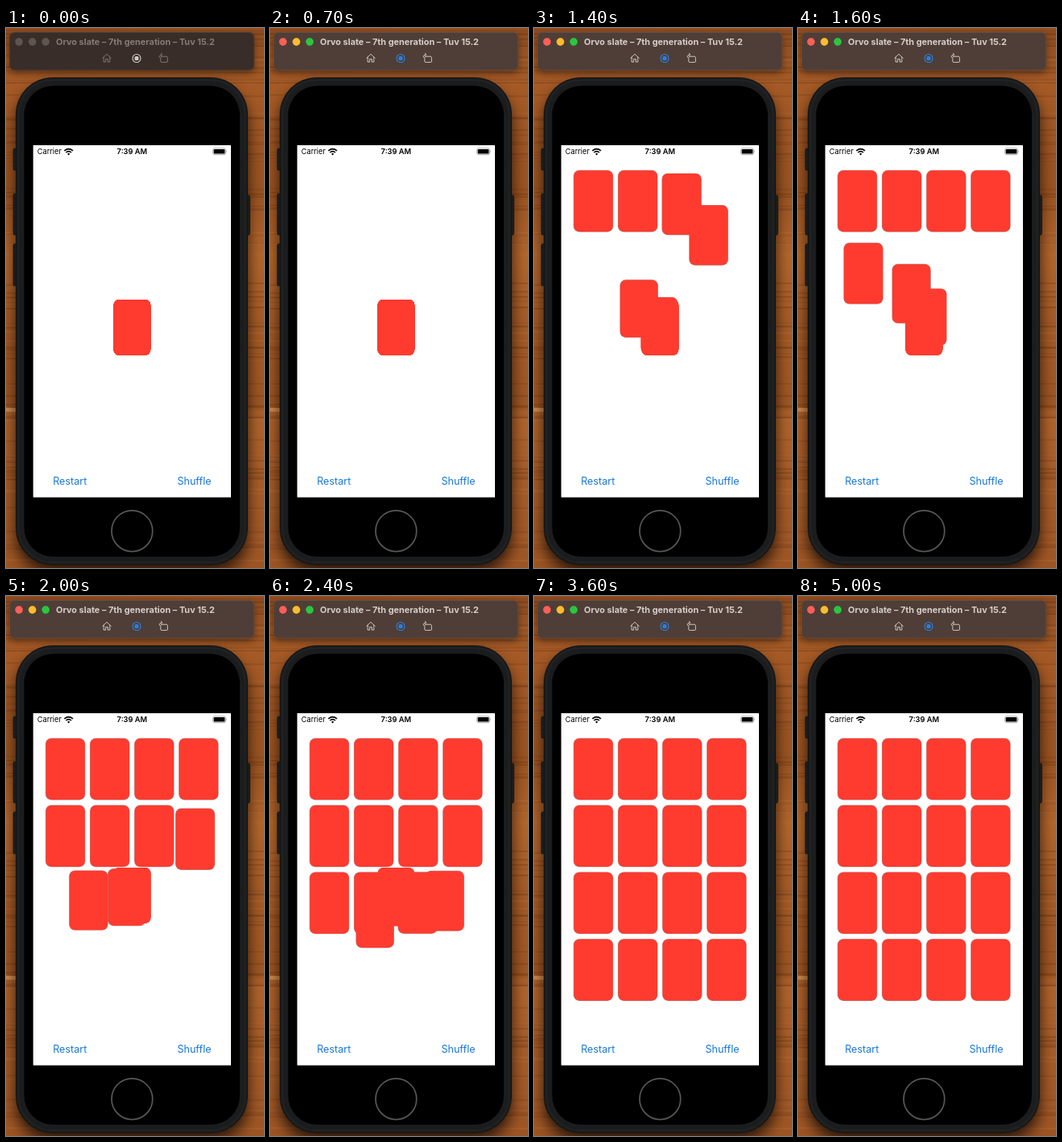
These frames come from a looping animation (320 px wide and 668 px high, 5.1 s). An HTML page:

```html
<!DOCTYPE html>
<html lang="en">
<head>
<meta charset="utf-8">
<title>Card deal</title>
<style>
  html, body { margin: 0; width: 100%; height: 100%; overflow: hidden; background: #9a5424; }
  svg { display: block; width: 100vw; height: 100vh; }
  text { font-family: Inter, "Liberation Sans", sans-serif; }
</style>
</head>
<body>
<svg viewBox="0 0 320 668" preserveAspectRatio="none">
  <defs>
    <linearGradient id="wood" x1="0" y1="0" x2="0" y2="1">
      <stop offset="0" stop-color="#8f4c20"/>
      <stop offset=".1" stop-color="#a55a26"/>
      <stop offset=".3" stop-color="#9a5321"/>
      <stop offset=".42" stop-color="#b2652c"/>
      <stop offset=".55" stop-color="#a45a26"/>
      <stop offset=".7" stop-color="#9f5623"/>
      <stop offset=".72" stop-color="#b0632c"/>
      <stop offset="1" stop-color="#9c5424"/>
    </linearGradient>
    <filter id="soft" x="-20%" y="-30%" width="140%" height="170%">
      <feGaussianBlur stdDeviation="5"/>
    </filter>
    <filter id="wide" x="-20%" y="-10%" width="140%" height="120%">
      <feGaussianBlur stdDeviation="9"/>
    </filter>
  </defs>

  <rect width="320" height="668" fill="url(#wood)"/>
  <g id="grain" fill="none"></g>
  <path d="M0 469.5L12 470V475L0 474.5Z" fill="#d08c4e"/>

  <!-- toolbar window -->
  <rect x="4" y="9" width="304" height="47" rx="7" fill="#000" opacity=".4" filter="url(#soft)"/>
  <rect id="bar" x="4.5" y="5.5" width="303.3" height="46.6" rx="6" stroke-width=".8"/>
  <g id="lights">
    <circle cx="16.1" cy="17.1" r="4.8"/>
    <circle cx="32.7" cy="17.1" r="4.8"/>
    <circle cx="49.2" cy="17.1" r="4.8"/>
  </g>
  <text id="title" x="62" y="20.7" font-size="10.9" font-weight="700">Orvo slate – 7th generation – Tuv 15.2</text>
  <g id="tools" fill="none" stroke-width="1" stroke-linejoin="round" stroke-linecap="round">
    <path d="M119.8 37.2L125 32.3L130.2 37.2M121.2 36.2V42H123.7V38.4H126.3V42H128.8V36.2"/>
    <path d="M193.2 35.2H199Q200.4 35.2 200.4 36.6V41Q200.4 42.4 199 42.4H193.2Q191.8 42.4 191.8 41V36.6Q191.8 35.2 193.2 35.2M190 36.2Q190 32.8 193.6 32.7M192.4 31.4L193.9 32.7L192.4 34"/>
  </g>
  <g id="shot">
    <circle cx="162" cy="37.5" r="5" fill="none" stroke="currentColor" stroke-width="1.1"/>
    <rect x="159.5" y="35" width="5" height="5" rx="1.6" fill="currentColor"/>
  </g>

  <!-- device -->
  <rect x="12" y="72" width="288" height="603" rx="46" fill="#000" opacity=".72" filter="url(#wide)"/>
  <g fill="#1c1c1d" stroke="#0e0e0e" stroke-width=".6">
    <rect x="9" y="149" width="7" height="27" rx="2"/>
    <rect x="9" y="205" width="7" height="51" rx="2"/>
    <rect x="9" y="267" width="7" height="52" rx="2"/>
    <rect x="296" y="207" width="6.5" height="49" rx="2"/>
  </g>
  <rect x="12.5" y="61.5" width="287" height="602.5" rx="45" fill="#1b1c1d" stroke="#151516"/>
  <rect x="15.5" y="64.5" width="281" height="596.5" rx="42" fill="none" stroke="#232425" stroke-width="1.5"/>
  <rect x="22.5" y="71.5" width="267.5" height="582.5" rx="36" fill="#000"/>
  <circle cx="156.4" cy="622.2" r="25.4" fill="#000" stroke="#58595a" stroke-width="1.7"/>

  <!-- screen -->
  <rect x="33.7" y="145" width="245.3" height="435.6" fill="#fff"/>
  <text x="38.8" y="156.4" font-size="9.2">Carrier</text>
  <g fill="none" stroke="#000" stroke-width="1.6">
    <path d="M72.4 151.8Q77.7 147.4 83 151.8"/>
    <path d="M74.3 154Q77.7 151.2 81.1 154"/>
  </g>
  <path d="M75.9 155.6Q77.7 154.2 79.5 155.6L77.7 157.4Z"/>
  <text x="156.4" y="156.4" font-size="9.3" font-weight="600" text-anchor="middle">7:39 AM</text>
  <rect x="256.6" y="148.9" width="15.9" height="7.8" rx="2.2" fill="none" stroke="#888" stroke-width=".7"/>
  <rect x="257.7" y="150" width="13.7" height="5.6" rx="1.2"/>
  <path d="M273.4 151.6Q274.6 152.8 273.4 154Z" fill="#888"/>
  <g fill="#1677d8" font-size="12.6">
    <text x="58.2" y="564.8">Restart</text>
    <text x="212.4" y="564.8">Shuffle</text>
  </g>
  <g id="edges" fill="#8a6a6a"></g>
  <g id="faces" fill="#ff3b30"></g>
</svg>
<script>
const LOOP = 5100, TICK = 100;
const ACTIVE_AT = 700, DEAL_AT = 705, STAGGER = 125, MOVE = 500;
const START = { x: 133.5, y: 336, w: 45.7, h: 68.7 };
const $ = id => document.getElementById(id);

function add(parent, tag, attrs) {
  const el = document.createElementNS("http://www.w3.org/2000/svg", tag);
  return parent.appendChild(set(el, attrs));
}
function set(el, attrs) {
  for (const k in attrs) el.setAttribute(k, attrs[k]);
  return el;
}
const mix = (a, b, p) => a + (b - a) * p;

// ease-in-out: cubic-bezier(.42, 0, .58, 1)
function ease(x) {
  if (x <= 0) return 0;
  if (x >= 1) return 1;
  let lo = 0, hi = 1, u = x;
  for (let i = 0; i < 24; i++) {
    u = (lo + hi) / 2;
    const v = 1 - u;
    if (1.26 * u * v * v + 1.74 * u * u * v + u * u * u < x) lo = u; else hi = u;
  }
  return u * u * (3 - 2 * u);
}

function drawGrain() {
  let seed = 17;
  const rnd = () => (seed = seed * 16807 % 2147483647) / 2147483647;
  for (let i = 0; i < 110; i++) {
    const y = rnd() * 668, dip = rnd() * 4 - 2;
    add($("grain"), "path", {
      d: `M0 ${y}Q80 ${y + dip} 160 ${y}T320 ${y - dip}`,
      stroke: rnd() < .65 ? "#63300f" : "#bd7337",
      "stroke-width": .6 + rnd() * 2,
      opacity: .1 + rnd() * .25
    });
  }
}

const cards = Array.from({ length: 16 }, (_, i) => ({
  x: 49.3 + 55.1 * (i % 4),
  y: 176.2 + 82.8 * Math.floor(i / 4),
  w: 48.6, h: 75.9,
  begin: DEAL_AT + STAGGER * i,
  edge: add($("edges"), "rect", { rx: 7.3 }),
  face: add($("faces"), "rect", { rx: 7 })
}));

function placeCard(c, t) {
  const p = ease((t - c.begin) / MOVE);
  const [x, y, w, h] = ["x", "y", "w", "h"].map(k => mix(START[k], c[k], p));
  set(c.face, { x, y, width: w, height: h });
  set(c.edge, { x: x - .4, y: y - .4, width: w + .8, height: h + .8, opacity: .7 * Math.min(1, p * 4) });
}

function paintWindow(on) {
  set($("bar"), { fill: on ? "#4e3e37" : "#382d28", stroke: on ? "#63524a" : "#4b403a" });
  const lights = on ? ["#ff5f57", "#febc2e", "#28c840"] : ["#5f5550", "#5f5550", "#5f5550"];
  lights.forEach((c, i) => set($("lights").children[i], { fill: c }));
  set($("title"), { fill: on ? "#d6cdc8" : "#857a74" });
  set($("tools"), { stroke: on ? "#cdc4bf" : "#82776f" });
  set($("shot"), { color: on ? "#2b80e2" : "#d2cac5" });
}

function render(t) {
  paintWindow(t >= ACTIVE_AT);
  cards.forEach(c => placeCard(c, t));
}

function loop() {
  const t = performance.now() % LOOP;
  render(Math.floor(t / TICK) * TICK);
  requestAnimationFrame(loop);
}

drawGrain();
render(0);
requestAnimationFrame(loop);
</script>
</body>
</html>
```
